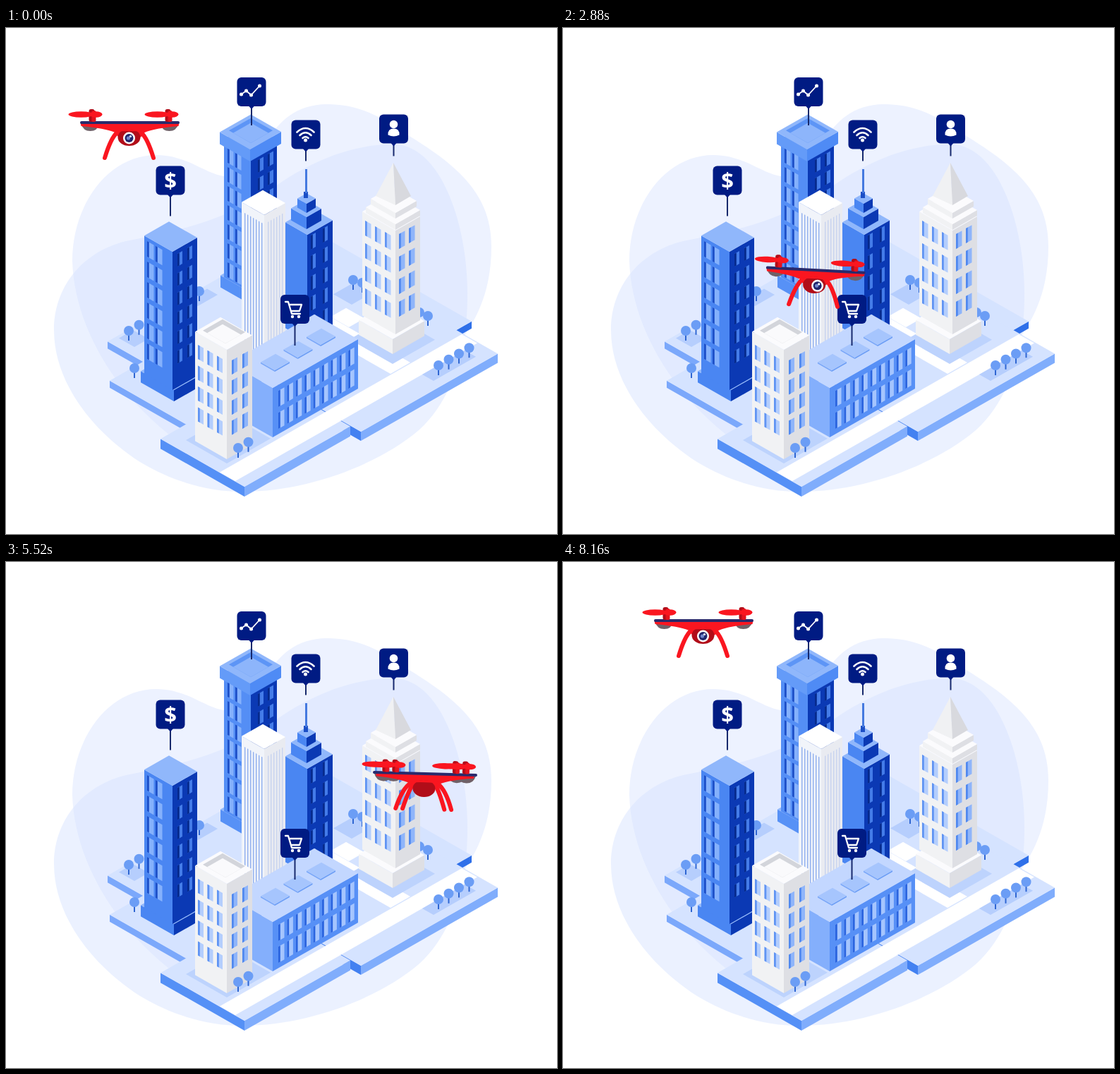
Animation, 781 px wide and 717 px high, one loop 8.19 s. Source, as an HTML page:

```html
<!DOCTYPE html>
<html lang="en">
<head>
<meta charset="utf-8">
<title>Drone over the city</title>
<style>
html, body { margin: 0; width: 100%; height: 100%; overflow: hidden; background: #fff; }
svg { display: block; width: 781px; height: 717px; }
.dollar { font: 700 31px "Open Sans", Arial, sans-serif; fill: #fff; text-anchor: middle; }
.line { fill: none; stroke: #fff; stroke-linecap: round; stroke-linejoin: round; }
.pin rect, .pin .tip { fill: #001b83; }
.pin .stem { stroke: #17296c; stroke-width: 2; }
.leg { fill: none; stroke: #fa1620; stroke-width: 6; stroke-linecap: round; }
</style>
</head>
<body>
<svg viewBox="0 0 781 717">
  <defs>
    <clipPath id="dome"><ellipse cx="-1" cy="21" rx="16" ry="12"/></clipPath>
  </defs>
  <path fill="#edf2ff" d="M94 330C94 250 145 180 213 180C260 180 285 211 318 211C365 207 365 109 455 108C500 108 530 125 570 152C640 195 688 235 688 310C688 380 662 420 640 450L300 620C180 560 97 440 94 330Z"/>
  <path fill="#d3e0ff" opacity=".45" d="M68 428C68 370 105 318 170 302C245 288 320 270 385 222C440 184 500 163 555 165C620 172 655 285 654 380C654 450 635 525 585 570C530 617 430 657 335 657C290 657 240 645 190 615C120 570 68 500 68 428Z"/>
  <g id="city"></g>
  <g id="pins"></g>
  <g id="drone">
    <g id="motors"></g>
    <path fill="#fa1620" d="M-70 0H70L69 5Q35 8 21 14Q17 24 -1 24Q-17 24 -21 14Q-35 8 -69 5Z"/>
    <rect id="bar" y="-2" height="4" rx="2" fill="#292a6c"/>
    <g id="legs"></g>
    <ellipse cx="-1" cy="21" rx="16" ry="12" fill="#b10d19"/>
    <path fill="#fa1620" d="M-21 13Q-1 5 19 13Q-1 11 -21 13Z"/>
    <g clip-path="url(#dome)"><g id="eye">
      <circle cy="22" r="8.5" fill="#fff"/><circle cy="22" r="6" fill="#20256c"/>
      <circle cx="-1" cy="22" r="2.6" fill="#7187ce"/><circle cx="2" cy="19.5" r="1.6" fill="#fff"/>
    </g></g>
    <g id="rotors"></g>
  </g>
</svg>
<script>
const $ = id => document.getElementById(id);
const K = .57; // slope of every ground line

let art = '';
const path = (d, fill) => art += `<path d="${d}" fill="${fill}"/>`;
const dot = (x, y, r, fill) => `<circle cx="${x}" cy="${y}" r="${r}" fill="${fill}"/>`;
const pane = (x, y, w, h, k) => `M${x} ${y}l${w} ${w * k}v${h}l${-w} ${-w * k}z`;

// Flat tile: front corner, then its reach to the left and right
function tile(x, y, a, b, fill) {
  path(`M${x} ${y}l${-a} ${-a * K}l${b} ${-b * K}l${a} ${a * K}z`, fill);
}

function box(x, y, a, b, h, [top, left, right]) {
  path(pane(x - a, y - a * K, a, h, K), left);
  path(pane(x, y, b, h, -K), right);
  tile(x, y, a, b, top);
}

// side: 1 on a left wall, -1 on a right wall
function windows(x, y, side, cols, gap, rows, step, w, h, [glass, edge]) {
  let panes = '', edges = '';
  for (let c = 0; c < cols; c++) for (let r = 0; r < rows; r++) {
    const px = x + c * gap, py = y + c * gap * K * side + r * step;
    panes += pane(px, py, w, h, K * side);
    edges += pane(px, py, 2.8, h, K * side);
  }
  path(panes, glass);
  path(edges, edge);
}

function stripes(x, y, side, n, h, fill) {
  let d = '';
  for (let i = 0; i < n; i++) d += pane(x + i * 4, y + i * 4 * K * side, 1.4, h, K * side);
  path(d, fill);
}

function trees(x, y, n = 1) {
  for (let i = 0; i < n; i++) {
    const tx = x + i * 14.5, ty = y - i * 14.5 * K;
    art += `<path d="M${tx} ${ty}v14" stroke="#2f66d2" stroke-width="2"/>` + dot(tx, ty, 7, '#6b9df5');
  }
}

const LAWN = '#d5e3ff', BED = '#b6cefd', PATH = '#bdd3fd';
const BLUE = ['#90b7fb', '#4a86f2', '#0b39b4'];
const SKY = ['#90b7fb', '#649bf8', '#4f8bf5'];
const STONE = ['#fbfbfd', '#f1f2f4', '#dedfe4'];
const LIT = ['#85b1fc', '#1c4fc8'], DIM = ['#447ce9', '#062a8d'];
const PALE = ['#b4cefd', '#6094f3'], SHADE = ['#8fb5fa', '#5189ef'];

// Ground
box(377, 577, 233, 283, 10, [LAWN, '#7ba8fb', '#2f70e9']);
box(300, 587, 153, 60, 10, [LAWN, '#7ba8fb', '#7ba8fb']);
box(503, 572, 200, 194, 13, [LAWN, '#4381f1', '#80adfc']);
box(338, 650, 119, 150, 14, [LAWN, '#5590f6', '#80adfc']);
tile(325, 642, 22, 343, '#fff');
tile(545, 490, 115, 28, '#fff');
tile(486, 424, 26, 22, '#fff');
tile(182, 452, 22, 20, BED);
tile(272, 394, 15, 28, BED);
tile(490, 392, 26, 32, BED);
tile(606, 500, 16, 60, BED);
tile(548, 476, 61, 60, PATH);
tile(313, 617, 58, 62, PATH);
trees(174, 429, 2);
trees(182, 482);
trees(274, 373);
trees(492, 357);
trees(505, 361);
trees(586, 403);
trees(598, 408);

// Tall tower with a capped roof
box(340, 371, 36, 44, 17, ['#90b7fb', '#5791f6', '#0d3cb8']);
box(347, 179, 38, 37, 196, ['#90b7fb', '#548ef5', '#0b39b4']);
windows(314, 170, 1, 2, 11, 7, 27, 8.5, 21, LIT);
windows(357, 187, -1, 2, 14, 7, 26, 8, 18, DIM);
box(346, 172, 43, 44, 17, SKY);
tile(347, 163, 31, 31, '#5d95f6');
tile(347, 163, 25, 25, '#8db5fb');

// Tower with an antenna
box(427, 293, 31, 36, 150, BLUE);
windows(432, 294, -1, 2, 17, 5, 29, 7, 20, DIM);
for (let i = 0; i < 2; i++) box(426, 268 - i * 19, 22 - i * 9, 21 - i * 8, 17 - i * 4, BLUE);
path('M422 232h6v9h-6z', '#1c4fc6');
path('M424 200h3v34h-3z', '#4479df');

// Striped tower
box(366, 265, 32, 30, 205, ['#fff', '#f1f4fa', '#e9ebf1']);
stripes(338, 262, 1, 7, 190, '#8faeee');
stripes(371, 275, -1, 6, 195, '#c7d3ef');

// Left tower
box(238, 513, 47, 37, 16, BLUE);
box(236, 317, 40, 35, 196, BLUE);
windows(200, 302, 1, 2, 12, 6, 29, 9.5, 22, LIT);
windows(243, 320, -1, 2, 14, 6, 27.5, 7, 18, DIM);

// Spire building
box(548, 441, 48, 45, 21, STONE);
box(552, 287, 47, 35, 147, STONE);
windows(509, 273, 1, 3, 14, 4, 32, 8.5, 21, PALE);
windows(557, 292, -1, 2, 14, 4, 32, 8.5, 21, SHADE);
for (let i = 0; i < 2; i++) box(552, 278 - i * 16, 42 - i * 7, 35 - i * 5, 8, STONE);
path('M549 191L524 238L552 251z', '#f0f1f3');
path('M549 191L552 251L574 238z', '#d8d9de');

// Mall
box(378, 510, 62, 121, 70, ['#c3d7ff', '#84affc', '#5790f6']);
for (let i = 0; i < 3; i++) box(381 + i * 32.5, 485 - i * 18, 20, 21, 2, ['#a6c5fd', '#7aa7f8', '#6b9df5']);
windows(386, 514, -1, 9, 12.4, 2, 31, 8.5, 23, ['#a5c5fe', '#2a64df']);

// Front building
box(313, 456, 45, 36, 155, STONE);
tile(311, 447, 32, 28, '#d3d5db');
tile(311, 447, 26, 22, '#fafafc');
windows(272, 449, 1, 3, 13.5, 4, 29.5, 8, 20, PALE);
windows(320, 471, -1, 2, 15, 4, 28.5, 8, 20, SHADE);
trees(329, 595, 2);
trees(613, 478, 4);
$('city').innerHTML = art;

// Pins: corner, stem length and white mark
const line = (d, w) => `<path class="line" stroke-width="${w}" d="${d}"/>`;
function pin(x, y, stem, mark) {
  $('pins').innerHTML += `<g class="pin" transform="translate(${x} ${y})">
    <path class="stem" d="M20.500 40v${stem}"/><path class="tip" d="M16 40h9l-4.500 5z"/>
    <rect width="41" height="41" rx="6"/>${mark}</g>`;
}
const ends = [[6, 24], [13, 19], [20, 25], [32, 12]];
pin(327.5, 70, 28, line('M' + ends.join('L'), 1.8) + ends.map(p => dot(...p, 2.5, '#fff')).join(''));
pin(404.5, 130.5, 18, line('M8 17Q20 6 32 17M12 21.5Q20 14 28 21.5M16 25.5Q20 22 24 25.5', 2.6) + dot(20, 28.5, 2.5, '#fff'));
pin(529, 122.5, 19, dot(20.5, 14, 5.8, '#fff') + '<path fill="#fff" d="M12.500 29Q12 20 20.500 20Q29 20 28.500 29Q20.500 33 12.500 29Z"/>');
pin(212.5, 195.5, 31, '<text class="dollar" x="20.500" y="31">$</text>');
pin(389, 378, 32, line('M7 10H11L16 27H28M12 14H30L27 23H15', 2.3) + dot(17, 31, 2.2, '#fff') + dot(26, 31, 2.2, '#fff'));

// Flight: time, x, y, tilt
const LOOP = 8190, STEP = 30;
const flight = [
  [0, 175.5, 134, 0],
  [1260, 202, 230, -3.7],
  [2220, 325, 312, 4.9],
  [3540, 391, 355, .3],
  [5520, 594, 300, 1.5],
  [6750, 465, 201, -4.7],
  [8160, 199.5, 83, 0]
];

const smooth = u => u * u * (3 - 2 * u);
const ramp = (t, from, to) => smooth(Math.min(1, Math.max(0, (t - from) / (to - from))));

function slope(i, c) {
  const a = flight[Math.max(i - 1, 0)], b = flight[Math.min(i + 1, flight.length - 1)];
  return (b[c] - a[c]) / (b[0] - a[0]);
}

// Spline through the flight points
function pose(t) {
  let i = 0;
  while (i < flight.length - 2 && t >= flight[i + 1][0]) i++;
  const a = flight[i], b = flight[i + 1], span = b[0] - a[0], u = (t - a[0]) / span;
  return [1, 2, 3].map(c => a[c] + (b[c] - a[c]) * smooth(u)
    + span * u * (1 - u) * ((1 - u) * slope(i, c) - u * slope(i + 1, c)));
}

function rotor(x, l, r) {
  const blade = (from, to) => `<ellipse cx="${(from + to) / 2}" cy="-11.500" rx="${Math.abs(to - from) / 2}" ry="4.200" fill="#fa1620"/>`;
  return `<rect x="${x - 4}" y="-19" width="8" height="18" rx="3" fill="#b10d19"/>
    <rect x="${x}" y="-17" width="6" height="16" rx="2" fill="#e3131e"/>` + blade(x + 3, x - l) + blade(x - 3, x + r);
}

function draw(now) {
  const t = Math.floor(now % LOOP / STEP) * STEP;
  const [x, y, tilt] = pose(t);
  const turn = ramp(t, 4300, 5100) - ramp(t, 7100, 7700); // 1 shows the back
  const spread = 7 * turn, half = 70.5 + spread / 2, hub = 54 - spread * .6;
  const swing = 9 * Math.cos(t / 120 * 2 * Math.PI);
  const layers = turn ? [-spread, spread] : [0];
  const each = f => layers.map(f).join('');

  $('drone').setAttribute('transform', `translate(${x} ${y}) rotate(${tilt})`);
  $('bar').setAttribute('x', -half);
  $('bar').setAttribute('width', half * 2);
  $('eye').setAttribute('transform', `translate(${tilt * 1.5 + turn * 36 - 1})`);
  $('motors').innerHTML = each(s => [-hub - 2, hub + 2].map(c =>
    `<path d="M${c + s - 13} 2h26q-3 10 -13 10t-13 -10z" fill="#6f6168"/>`).join(''));
  $('legs').innerHTML = each(s => {
    const d = s * .7;
    return `<path class="leg" d="M${-18 + d / 2} 14Q${-27 + d} 22 ${-35.5 + d} 50M${16 + d / 2} 14Q${25 + d} 22 ${33.5 + d} 50"/>`;
  });
  $('rotors').innerHTML = each(s => [-hub, hub].map(c => rotor(c + s, 24 + swing, 24 - swing)).join(''));
}

const start = performance.now();
function tick() {
  draw(performance.now() - start);
  requestAnimationFrame(tick);
}
tick();
</script>
</body>
</html>
```
